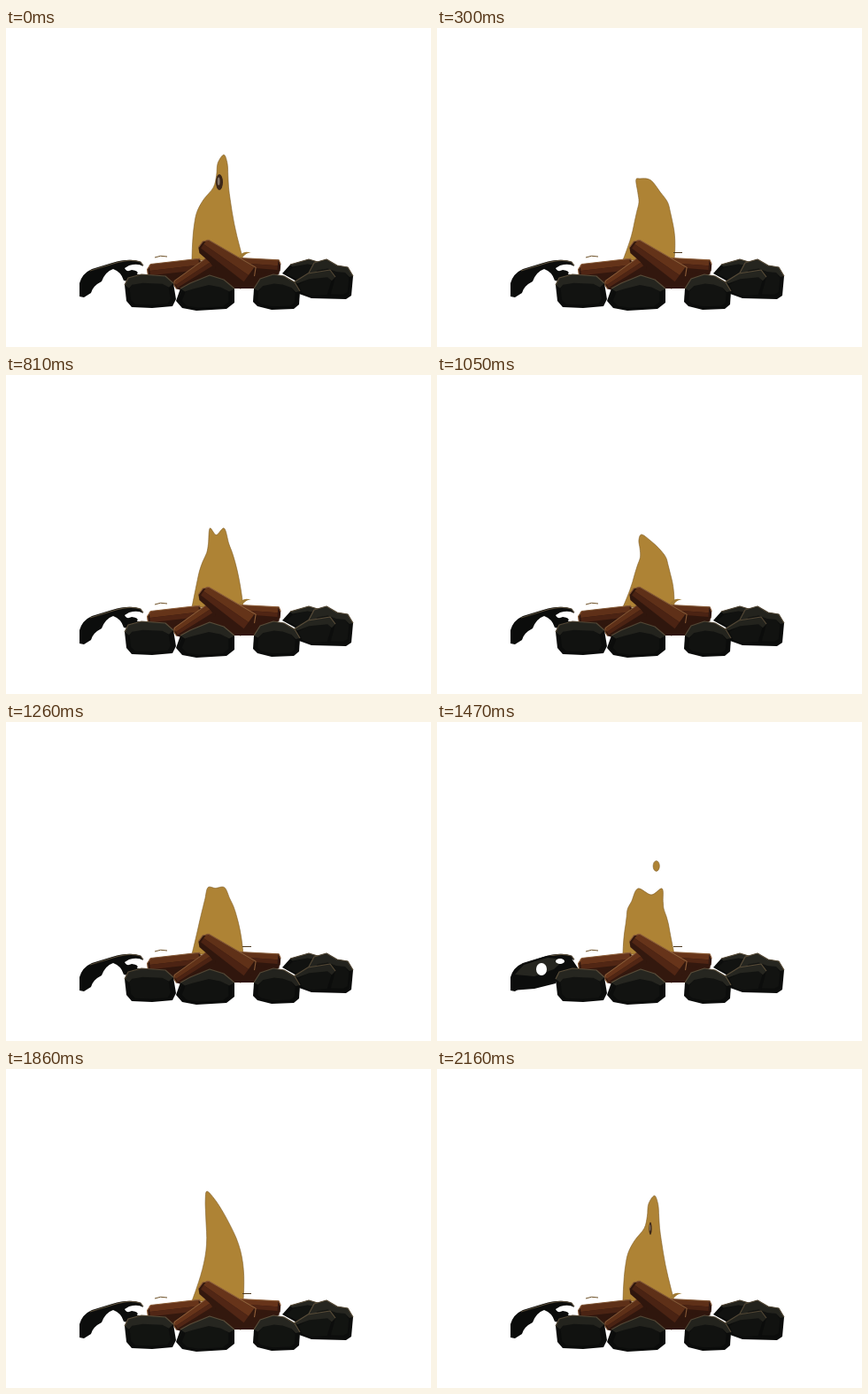
Animation of 480 by 360 pixels, one loop 2190 ms. Source, as an HTML page:

```html
<!DOCTYPE html>
<html lang="en">
<head>
<meta charset="utf-8">
<title>Campfire</title>
<style>
html, body { margin: 0; width: 100%; height: 100%; overflow: hidden; background: #fff; }
svg { display: block; width: 480px; height: 360px; }
.flame { fill: #ae8335; stroke: #7c5b26; stroke-width: .6; }
.rock { fill: #0c0d0c; }
.top { fill: #25251f; }
.side { fill: #121311; }
.rim { fill: none; stroke: #574b38; stroke-width: 1.2; stroke-linejoin: round; }
.bark { fill: #32170e; }
.light { fill: #643319; }
.mid { fill: #4f2514; }
.edge { fill: none; stroke: #8c5d38; stroke-width: 1.1; stroke-linejoin: round; }
</style>
</head>
<body>
<svg viewBox="0 0 480 360">
  <path id="body" class="flame"/>
  <g id="hole">
    <ellipse rx="4" ry="9" fill="#3b2618"/>
    <ellipse cx="-.8" cy="-1" rx="1.4" ry="4.5" fill="#86776a"/>
  </g>
  <ellipse id="spark" class="flame"/>
  <path d="M168 259Q174 256 182 258" fill="none" stroke="#6d5128"/>
  <path id="curl" d="M262 260Q267 250 277 254Q272 253 267 259Z" fill="#a07a35"/>
  <path id="dash" d="M267 253.500H277" stroke="#4b3820"/>

  <g id="scene">
    <!-- left stone with its thin arm -->
    <path class="rock" d="M83 303V288Q86 277 97 272L120 265Q140 259 152 264L155 269Q149 265 139 268L134 271Q136 276 142 273Q151 274 148 278L162 279L150 288L133 285Q130 275 121 272Q112 275 108 286Q98 291 96 299L88 304Z"/>
    <path class="rim" d="M95 274L121 266Q140 260 152 264L155 268"/>
    <g id="full">
      <path class="rock" d="M84 303V287L96 273L124 264L150 264L160 279L138 285L134 295L110 301Z"/>
      <path class="top" d="M88 285L98 274L125 266L144 268L132 279L110 287Z"/>
      <ellipse cx="118" cy="279" rx="6" ry="7" fill="#fff"/>
      <ellipse cx="139" cy="270" rx="5" ry="3" fill="#fff"/>
    </g>
    <ellipse id="chip" class="rock" cx="118" cy="297.500" rx="4.500" ry="2.500"/>
    <g id="pile"></g>
  </g>
</svg>
<script>
const LOOP = 2190, STEP = 30, BASE = 262, CROWN = .92;
const $ = id => document.getElementById(id);
const mix = (a, b, k) => a + (b - a) * k;
const within = (t, a, b) => t >= a && t < b;
const show = (id, on) => $(id).setAttribute("visibility", on ? "visible" : "hidden");
const poly = (cls, pts, close = "Z") => `<path class="${cls}" d="M${pts.join("L")}${close}"/>`;

// A faceted stone: lit upper plane, darker front plane and a pale rim, all from its outline.
function stone(outline) {
  const pts = outline.split(" ").map(p => p.split(",").map(Number));
  const mean = c => pts.reduce((sum, p) => sum + p[c], 0) / pts.length;
  const cx = mean(0), cy = mean(1);
  const crest = pts.filter(p => p[1] < cy);
  const fold = crest.map(([x, y]) => [mix(x, cx, .18), mix(y, cy, .5)]);
  const front = pts.map(([x, y]) => [mix(cx, x, .8), mix(cy, y, .7) + 2]);
  return poly("rock", pts) + poly("side", front)
    + poly("top", [...crest, ...fold.reverse()]) + poly("rim", crest, "");
}

// A tapering log from one point to another, split into bands along its length.
function log(x1, y1, x2, y2, w1, w2) {
  const len = Math.hypot(x2 - x1, y2 - y1), a = w1 / 2, b = w2 / 2;
  const turn = Math.atan2(y2 - y1, x2 - x1) * 180 / Math.PI;
  const near = [a * .5, -a], far = [len - b * .3, -b];
  const shape = [[0, -a * .4], near, far, [len, -b * .4], [len, b * .5], [len - b * .3, b], [a * .5, a], [0, a * .5]];
  const band = (cls, from, to) => poly(cls, [[a * .3, a * from], [len - b * .4, b * from], [len - b * .4, b * to], [a * .3, a * to]]);
  return `<g transform="translate(${x1} ${y1}) rotate(${turn})">`
    + poly("bark", shape) + band("light", -.95, -.2) + band("mid", -.2, .4)
    + poly("edge", [shape[7], shape[0], near, far, shape[3]], "") + "</g>";
}

$("pile").innerHTML = [
  stone("312,277 321,267 342,261 352,264 350,276 330,287"),
  stone("340,280 348,265 362,261 374,268 386,270 392,280 390,302 384,306 345,305"),
  stone("325,287 341,277 366,273 372,281 366,303 345,305 331,300"),
  poly("bark", [[165, 281], [205, 266], [300, 263], [309, 277], [281, 294], [200, 294]]),
  log(160, 276, 222, 269, 18, 18),
  log(255, 266, 310, 270, 14, 16),
  log(191, 292, 234, 264, 12, 16),
  log(220, 244, 277, 285, 18, 30),
  stone("134,290 138,282 153,278 180,280 189,288 192,306 188,314 165,316 142,315 136,308"),
  stone("192,308 197,294 208,288 230,279 246,284 258,294 258,310 249,317 215,319 199,316"),
  stone("279,309 280,294 287,283 302,278 314,280 326,287 332,297 331,312 325,317 300,318 284,314")
].join("");

// Flame moods: tip height, sideways lean, neck offset, neck pinch, taper, fork depth
const moods = [
  [0, 143, 7, 5, 6, .6, 0],
  [300, 167, -10, 4, 0, .5, 3],
  [570, 166, 5, 0, 4, .38, 15],
  [1050, 180, -8, 4, 0, .6, 0],
  [1470, 188, 3, -3, 0, .3, 7],
  [1860, 138, -12, -1, 0, .65, 0]
];
moods.push([LOOP, ...moods[0].slice(1)]);

function moodAt(t) {
  const i = moods.findIndex(m => m[0] > t);
  const a = moods[i - 1], b = moods[i], k = (t - a[0]) / (b[0] - a[0]);
  const ease = k * k * (3 - 2 * k);
  return a.slice(1).map((v, j) => mix(v, b[j + 1], ease));
}

// Up the left side, over the crown, down the right side.
function flamePoints([top, lean, bump, neck, taper, fork]) {
  const left = [], right = [];
  for (let i = 0; i <= 8; i++) {
    const u = CROWN * i / 8, bell = Math.exp(-(((u - .72) / .15) ** 2));
    const x = 239 + lean * (u - Math.sin(Math.PI * u)) + bump * bell;
    const half = 29 * (1 - u) ** taper - neck * bell;
    const lift = i === 8 ? Math.min(fork, (1 - CROWN) * (BASE - top)) : 0;
    const y = mix(BASE, top, u) - lift;
    left.push([x - half, y]);
    right.unshift([x + half, y]);
  }
  return [...left, [239 + lean, top + fork], ...right];
}

// Catmull-Rom spline through the points, closed along the base.
function smooth(pts) {
  const at = i => pts[Math.max(0, Math.min(pts.length - 1, i))];
  let d = "M" + pts[0];
  for (let i = 0; i < pts.length - 1; i++) {
    const [a, b, c, e] = [at(i - 1), at(i), at(i + 1), at(i + 2)];
    const c1 = b.map((v, j) => v + (c[j] - a[j]) / 6);
    const c2 = c.map((v, j) => v - (e[j] - b[j]) / 6);
    d += "C" + [c1, c2, c].join(" ");
  }
  return d + "Z";
}

// Sparks leave the tip at these times and shrink as they rise.
const launches = [30, 600, 1380, 1890], LIFE = 180;

function drawSpark(t) {
  const from = launches.find(s => within(t, s, s + LIFE));
  show("spark", from !== undefined);
  if (from === undefined) return;
  const [top, lean] = moodAt(from), k = (t - from) / LIFE, size = 1 - .4 * k * k;
  const attrs = { cx: 246 + lean, cy: mix(top, 138, k), rx: 4 * size, ry: 6.5 * size };
  for (const name in attrs) $("spark").setAttribute(name, attrs[name]);
}

function draw(t) {
  $("body").setAttribute("d", smooth(flamePoints(moodAt(t))));
  drawSpark(t);

  const early = t < 60;
  show("hole", early || t >= 2130);
  $("hole").setAttribute("transform", early ? "translate(241 174)" : "translate(241 180) scale(.4 .8)");

  const curled = t < 210 || within(t, 480, 1170) || t >= 2010;
  show("curl", curled);
  show("dash", !curled);
  show("full", within(t, 1320, 1620));
  show("chip", within(t, 510, 660));

  const glow = 1 + .06 * Math.sin((t - 300) / LOOP * 4 * Math.PI);
  $("scene").style.filter = `brightness(${glow.toFixed(3)})`;
}

const start = performance.now();
function tick() {
  const t = (performance.now() - start) % LOOP;
  draw(Math.floor(t / STEP) * STEP);
  requestAnimationFrame(tick);
}
tick();
</script>
</body>
</html>
```
